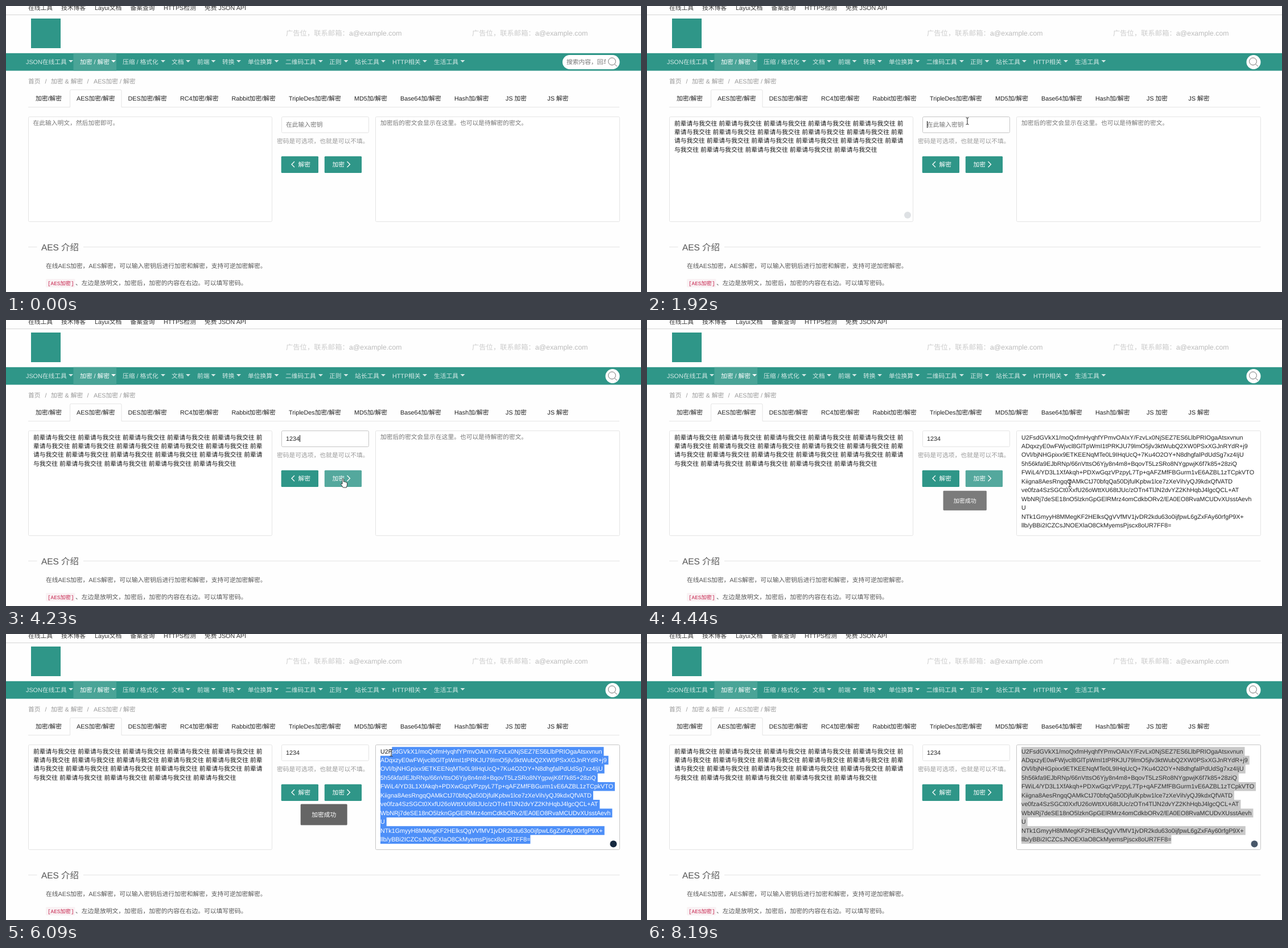
An HTML page that plays this animation: 1116 by 502 pixels, repeating every 8220 ms.

```html
<!DOCTYPE html>
<html lang="zh-CN">
<head>
<meta charset="utf-8">
<title>AES加密 / 解密</title>
<style>
html, body { margin: 0; width: 100%; height: 100%; overflow: hidden; background: #fefefe; }
svg { display: block; width: 1116px; height: 502px; }
text {
  font: 10.78px "Liberation Sans", "Noto Sans CJK SC", "Noto Sans CJK", sans-serif;
  text-rendering: geometricPrecision;
}
</style>
</head>
<body>
<svg id="stage" viewBox="0 0 1116 502"></svg>
<script>
const LOOP = 8220, STEP = 30;
const GREEN = '#2f9688', LINE = '#e4e4e4', FOCUS = '#c6c6c6';
const HINT = '#757575', MUTED = '#999', BODY = '#555', INK = '#222';
const stage = document.getElementById('stage');

// Drawing helpers
function add(tag, attrs = {}, parent = stage) {
  const el = document.createElementNS('http://www.w3.org/2000/svg', tag);
  for (const key in attrs) el.setAttribute(key, attrs[key]);
  return parent.appendChild(el);
}
function text(x, y, str, fill, parent = stage, size = 10.78) {
  const el = add('text', { x, y, fill }, parent);
  el.textContent = str;
  el.style.fontSize = size + 'px';
  return el;
}
const rect = (x, y, width, height, fill, parent = stage, rx = 0) =>
  add('rect', { x, y, width, height, fill, rx }, parent);
const path = (d, attrs, parent = stage) => add('path', { d, fill: 'none', ...attrs }, parent);
const group = (parent = stage) => add('g', {}, parent);
const row = (y, fill, items) => items.forEach(([x, str]) => text(x, y, str, fill));
function field(x, y, w, h) {
  const el = rect(x + .5, y + .5, w - 1, h - 1, '#fff', stage, 2);
  el.setAttribute('stroke', LINE);
  return el;
}
const show = (el, yes) => el.setAttribute('visibility', yes ? 'visible' : 'hidden');

// Header
row(7, '#333', [[39, '在线工具'], [97, '技术博客'], [156, 'Layui文档'],
  [218.5, '备案查询'], [277, 'HTTPS检测'], [349, '免费 JSON API']]);
rect(0, 15, 1116, 1, '#d6d6d6');
rect(44, 22, 52, 52, GREEN);
for (const x of [492, 819]) {
  text(x, 52, '广告位，联系邮箱：', '#ccc', stage, 12.32);
  text(x + 111, 52, 'a@example.com', '#bbb', stage, 12.32);
}

// Navigation
rect(0, 82.8, 1116, 30.8, GREEN);
rect(118.5, 82.8, 75.5, 30.8, '#4aa497');
[[35, 'JSON在线工具', 114], [130, '加密 / 解密', 189], [205, '压缩 / 格式化', 276],
 [291, '文档', 320], [336, '前端', 364.5], [380, '转换', 409], [425, '单位换算', 475.5],
 [491, '二维码工具', 553], [568, '正则', 597.5], [613, '站长工具', 663],
 [679, 'HTTP相关', 736], [752, '生活工具', 802.5]].forEach(([x, str, caret], i) => {
  const fill = i === 1 ? '#fff' : '#d5eae7';
  text(x, 102, str, fill);
  path(`M${caret - 4} 95h8l-4 4z`, { fill });
});

// Search pill
const PILL_END = 1078.5;
const pill = rect(978, 86, 100.5, 25, '#fff', stage, 12.5);
const pillClip = add('clipPath', { id: 'pillClip' });
const pillWindow = rect(985, 86, 69, 25, '#000', pillClip);
const pillText = text(985, 102, '搜索内容，回车', HINT, add('g', { 'clip-path': 'url(#pillClip)' }));
add('circle', { cx: 1065, cy: 97.3, r: 6.4, fill: 'none', stroke: '#666', 'stroke-width': .9 });
path('M1069.5 102l4.5 4', { stroke: '#666', 'stroke-width': .9 });

// Breadcrumb and tabs
row(136, MUTED, [[39, '首页'], [68.5, '/'], [79, '加密 & 解密'], [142.5, '/'], [154, 'AES加密 / 解密']]);
path('M39 177.5H112.5V149q0-2 2-2H201q2 0 2 2V177.5H1078', { stroke: LINE });
row(166, INK, [[52, '加密/解密'], [124, 'AES加密/解密'], [214.5, 'DES加密/解密'],
  [306, 'RC4加密/解密'], [396.5, 'Rabbit加密/解密'], [497, 'TripleDes加密/解密'],
  [612, 'MD5加/解密'], [693, 'Base64加/解密'], [788, 'Hash加/解密'],
  [878, 'JS 加密'], [951.5, 'JS 解密']]);

// Plain text box
const ROW = 15.45, TOP = 209.5;
const plainBox = field(39, 194, 429, 185);
const plainHint = text(47.5, 209, '在此输入明文，然后加密即可。', HINT);
const plain = group();
'前辈请与我交往 '.repeat(20).match(/.{1,41}/g)
  .forEach((str, i) => text(48, TOP + i * ROW, str, '#111', plain));

// Key box
const keyBox = field(484, 194, 154, 29);
const keyHint = text(492, 212, '在此输入密钥', HINT);
const keyText = text(492, 212, '', INK);
text(476, 241, '密码是可选项，也就是可以不填。', MUTED);

// Buttons
function button(x, label, labelX, arrow) {
  const g = group();
  rect(x, 263.7, 65.3, 29.4, GREEN, g, 1.5);
  text(labelX, 282, label, '#fff', g);
  path(arrow, { stroke: '#fff', 'stroke-width': 1.3 }, g);
  return g;
}
button(483.7, '解密', 513.5, 'M507 273l-5 5 5 5');
const encrypt = button(559.8, '加密', 573.5, 'M599.5 273l5 5-5 5');

// Cipher box
const cipherBox = field(649, 194, 430, 185);
const cipherHint = text(658, 209, '加密后的密文会显示在这里。也可以是待解密的密文。', HINT);
const cipherLines = `U2FsdGVkX1/moQxfmHyqhfYPmvOAIxY/FzvLx0NjSEZ7ES6LlbPRIOgaAtsxvnun
ADqxzyE0wFWjvcl8GlTpWmI1tPRKJU79lmO5jlv3ktWubQ2XW0PSxXGJnRYdR+j9
OVl/bjNHGpixx9ETKEENqMTe0L9IHqUcQ+7Ku4O2OY+N8dhgfalPdUdSg7xz4IjU
5h56kfa9EJbRNp/66nVttsO6Yjy8n4m8+BqovT5LzSRo8NYgpwjK6f7k85+28ziQ
FWiL4/YD3L1XfAkqh+PDXwGqzVPzpyL7Tp+qAFZMfFBGurm1vE6AZBL1zTCpkVTO
Kiigna8AesRngqQAMkCtJ70bfqQa50DjfulKpbw1lce7zXeVih/yQJ9kdxQfVATD
ve0fza4SzSGCt0XxfU26oWttXU68tJUc/zOTn4TlJN2dvYZ2KhHqbJ4lgcQCL+AT
WbNRj7deSE18nO5lzknGpGElRMrz4omCdkbORv2/EA0EO8RvaMCUDvXUsstAevh
U
NTk1GmyyH8MMegKF2HElksQgVVfMV1jvDR2kdu63o0ijfpwL6gZxFAy60rfgP9X+
llb/yBBi2ICZCsJNOEXlaO8CkMyemsPjscx8oUR7FF8=`.split('\n');
const SEL_TOP = 198.3;
const cipher = group();
const cipherRows = cipherLines.map((str, i) => text(658, TOP + i * ROW, str, INK, cipher));

// Selected copy of the cipher text, revealed through one window per line
const selClip = add('clipPath', { id: 'selClip' });
const selWindows = cipherLines.map((_, i) => rect(658, SEL_TOP + i * ROW, 0, ROW + .05, '#000', selClip));
const selection = add('g', { 'clip-path': 'url(#selClip)' });
const selBack = rect(650, 198, 428, 172, '#4d8ff8', selection);
const selText = group(selection);
cipherLines.forEach((str, i) => text(658, TOP + i * ROW, str, 'inherit', selText).removeAttribute('fill'));

const badge = () => add('circle', { r: 6, fill: '#14283f' });
const plainBadge = badge(), cipherBadge = badge();

// Introduction
rect(39, 422.5, 15.4, 1, LINE);
rect(136, 422.5, 942.5, 1, LINE);
text(62, 429, 'AES 介绍', BODY, stage, 15.4);
text(70, 460, '在线AES加密，AES解密，可以输入密钥后进行加密和解密，支持可逆加密解密。', BODY);
rect(70, 479, 51.5, 15, '#f9f2f4', stage, 2);
text(73, 490, '[AES加密]', '#c7254e', stage, 9.3).style.fontFamily =
  '"Liberation Mono", "Noto Sans CJK SC", "Noto Sans CJK", monospace';
text(122, 490, '、左边是放明文，加密后，加密的内容在右边。可以填写密码。', BODY);

// Toast, caret, pointer
const toast = group();
rect(-41, -18.5, 82, 37, 'rgba(0,0,0,.6)', toast, 1.5);
text(-21.5, 4, '加密成功', '#fff', toast);
const caret = rect(0, 0, 1, 12, '#111');
const outline = { fill: '#fff', stroke: '#222', 'stroke-width': .9 };
const pointers = {
  arrow: path('M0 0V13L3 10.2 5 15 7 14 5 9.6H9.2Z', outline),
  hand: path('M3 9V1.2Q4.2-.4 5.4 1.2V6Q6.6 5 7.6 6.4 8.8 5.6 9.6 7 11.4 6.4 11.6 8.4V11.5L10.4 16H4.4L.6 10.4Q.8 8.6 3 9.8Z', outline),
  beam: path('M-2.5-6Q-.5-6 0-5 .5-6 2.5-6M0-5V5M-2.5 6Q-.5 6 0 5 .5 6 2.5 6', { stroke: '#222' })
};

// time, x, y, pointer shape until the next row
const track = [
  [0, 1062, 95, ''], [30, 1068, 84, 'arrow'], [120, 1087, 50, 'arrow'], [300, 911, 125, 'arrow'],
  [480, 460, 215, 'beam'], [690, 300, 250, 'beam'], [1020, 300, 250, ''],
  [1290, 300, 250, 'beam'], [1440, 382, 189, 'beam'], [1500, 477, 184, 'arrow'],
  [1590, 592, 190, 'arrow'], [1650, 580, 199, 'beam'], [1740, 565, 202, 'beam'],
  [1890, 563, 202, 'beam'], [2100, 563, 202, ''], [3030, 563, 202, 'beam'],
  [3180, 562, 240, 'arrow'], [3270, 561, 278, 'hand'], [3360, 561, 289, 'hand'],
  [3450, 565, 291, 'hand'], [3570, 592, 280, 'hand'], [3660, 588, 278, 'hand'],
  [4260, 588, 278, 'hand'], [4320, 640, 284, 'arrow'], [4380, 715, 287, 'beam'],
  [4440, 743, 287, 'beam'], [4620, 730, 288, 'beam'], [4770, 730, 288, 'beam'],
  [5250, 926, 361, 'beam'], [5430, 926, 361, 'beam'], [5580, 870, 354, 'beam'],
  [5670, 794, 313, 'beam'], [6000, 677, 208, 'beam'], [6120, 677, 209, 'beam'],
  [6360, 655, 211, 'beam'], [6720, 653, 211, 'beam'], [6780, 653, 220, 'beam'],
  [6990, 653, 220, 'beam'], [7020, 700, 216, 'beam'], [7140, 1040, 184, 'arrow'],
  [7200, 1118, 176, ''], [LOOP, 1118, 176, '']
];

const clamp = v => Math.min(1, Math.max(0, v));
const part = (t, from, to) => clamp((t - from) / (to - from));
const mix = (a, b, k) => a + (b - a) * k;
const within = (t, from, to) => t >= from && t < to;

// CSS "ease" curve
function ease(p) {
  let lo = 0, hi = 1;
  const bez = (u, a, b) => 3 * u * (1 - u) ** 2 * a + 3 * u * u * (1 - u) * b + u ** 3;
  for (let i = 0; i < 20; i++) {
    const mid = (lo + hi) / 2;
    if (bez(mid, .25, .25) < p) lo = mid; else hi = mid;
  }
  return bez(lo, .1, 1);
}

function pointerAt(t) {
  const i = track.findIndex(k => k[0] > t) - 1;
  const a = track[i], b = track[i + 1], k = part(t, a[0], b[0]);
  return { x: mix(a[1], b[1], k), y: mix(a[2], b[2], k), shape: a[3] };
}

// Character edges of each cipher line
const edges = cipherRows.map(el => {
  const list = [];
  for (let i = 0; i < el.getNumberOfChars(); i++) list.push(el.getStartPositionOfChar(i).x);
  return [...list, 658 + el.getComputedTextLength()];
});

function drawSelection(t) {
  const active = t >= 5430;
  show(selection, active);
  if (!active) return;
  const p = pointerAt(Math.min(t - 25, 6360));
  const first = Math.max(0, Math.min(10, Math.floor((p.y - SEL_TOP) / ROW)));
  selWindows.forEach((el, i) => {
    const list = edges[i], end = list[list.length - 1] + (i < 10 ? 3 : 0);
    let start = 658;
    if (i === first) start = list.reduce((a, b) => Math.abs(b - p.x) < Math.abs(a - p.x) ? b : a);
    el.setAttribute('x', start);
    el.setAttribute('width', i < first ? 0 : Math.max(0, end - start));
  });
  const idle = t >= 8160;
  selBack.setAttribute('fill', idle ? '#c8c8c8' : '#4d8ff8');
  selText.setAttribute('fill', idle ? '#333' : '#fff');
}

function drawSearch(t) {
  const x = mix(978, PILL_END - 25, ease(part(t, 0, 400)));
  pill.setAttribute('x', x);
  pill.setAttribute('width', PILL_END - x);
  pillText.setAttribute('x', x + 7);
  pillWindow.setAttribute('x', x + 7);
  pillWindow.setAttribute('width', Math.max(0, 1054 - x - 7));
}

function drawToast(t) {
  let scale, opacity;
  if (t < 6990) {
    const k = ease(part(t, 4270, 4570));
    scale = mix(.5, 1, k);
    opacity = k;
  } else {
    const p = part(t, 6990, 7190), k = ease(part(p, .3, 1));
    scale = p < .3 ? mix(1, 1.05, ease(p / .3)) : mix(1.05, .7, k);
    opacity = 1 - k;
  }
  toast.setAttribute('transform', `translate(558.7 317) scale(${scale})`);
  toast.setAttribute('opacity', opacity);
}

function drawCaret(t) {
  const count = [2400, 2550, 2760, 2940].filter(at => t >= at).length;
  keyText.textContent = '1234'.slice(0, count);
  show(keyHint, !count);
  let x = 492 + count * 6, y = 202;
  if (t < 1020) [x, y] = [47, 199];
  else if (t < 1740) [x, y] = [405, 246];
  caret.setAttribute('x', x);
  caret.setAttribute('y', y);
  show(caret, within(t, 660, 1520) || within(t, 1740, 2250) ||
    within(t, 2400, 3450) || within(t, 3960, 4260));
}

function draw(t) {
  drawSearch(t);
  drawCaret(t);
  drawToast(t);
  drawSelection(t);

  const filled = t >= 1020, done = t >= 4260;
  show(plainHint, !filled);
  show(plain, filled);
  show(cipherHint, !done);
  show(cipher, done);
  plainBox.setAttribute('stroke', within(t, 660, 1740) ? FOCUS : LINE);
  keyBox.setAttribute('stroke', within(t, 1740, 4260) ? FOCUS : LINE);
  cipherBox.setAttribute('stroke', t >= 5430 ? FOCUS : LINE);
  encrypt.setAttribute('opacity', within(t, 4230, 4590) ? .82 : 1);

  plainBadge.setAttribute('transform', 'translate(458 367)');
  plainBadge.setAttribute('opacity', part(t, 690, 780) * (1 - part(t, 1740, 1950)));
  const settle = part(t, 5670, 5760) * 2.5;
  cipherBadge.setAttribute('transform', `translate(${1065 + settle} ${366 + settle})`);
  cipherBadge.setAttribute('opacity', part(t, 5430, 5550) * (t < 8160 ? 1 : t < 8190 ? .9 : .78));

  const p = pointerAt(t);
  for (const name in pointers) {
    show(pointers[name], name === p.shape);
    pointers[name].setAttribute('transform', `translate(${p.x} ${p.y})`);
  }
}

const begin = performance.now();
function tick() {
  const t = (performance.now() - begin) % LOOP;
  draw(Math.floor(t / STEP) * STEP);
  requestAnimationFrame(tick);
}
tick();
</script>
</body>
</html>
```
